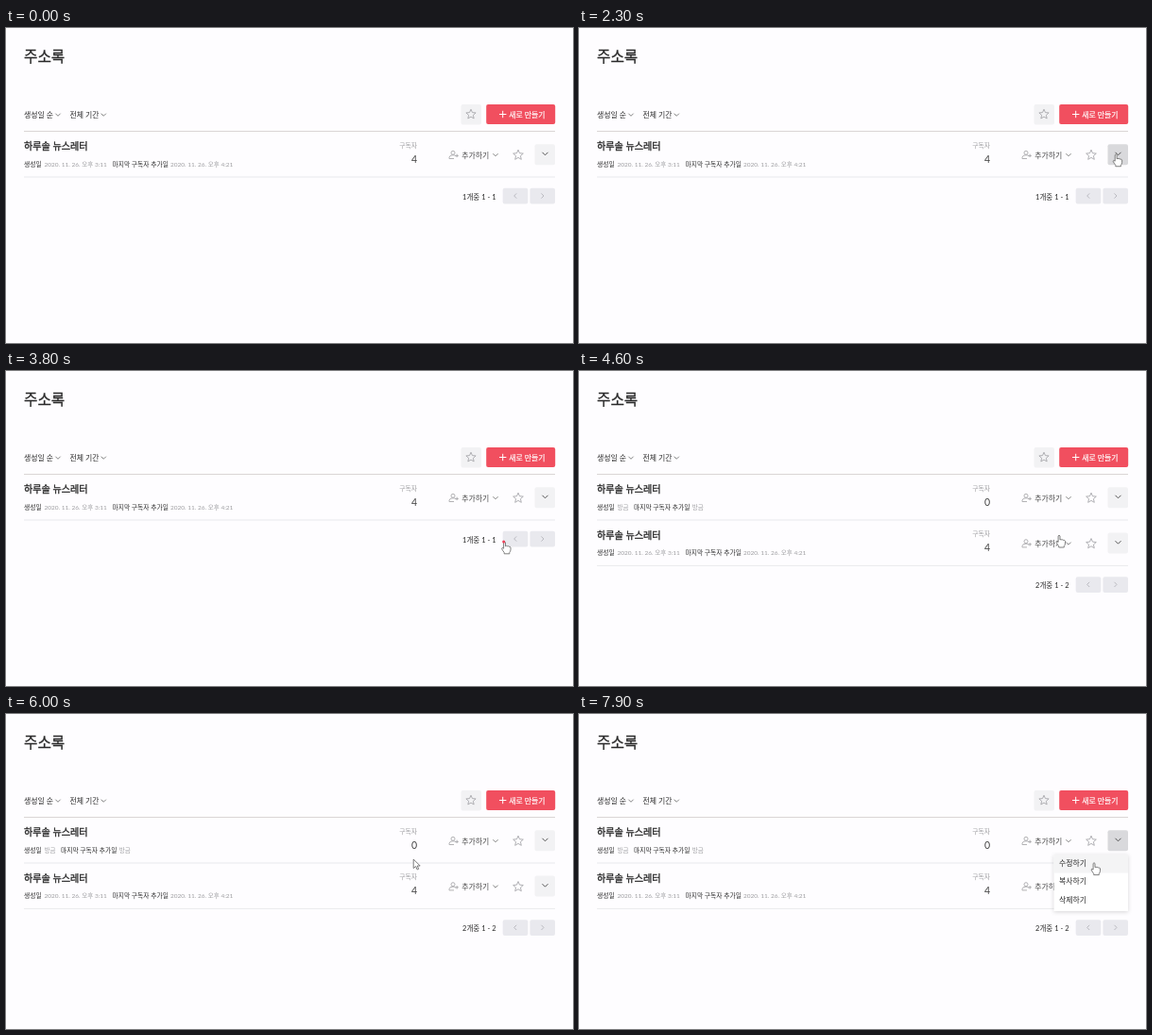
These frames come from a looping animation (600 by 334 pixels, 8000 ms). An HTML page:

```html
<!DOCTYPE html>
<html lang="ko">
<head>
<meta charset="utf-8">
<title>주소록</title>
<style>
html, body { margin: 0; width: 100%; height: 100%; overflow: hidden; background: #fefdff; }
svg { display: block; width: 600px; height: 334px; font-family: Lato, 'Noto Sans CJK KR', sans-serif; font-size: 7.9px; fill: #2a2a2a; }
.title { font-size: 15.7px; stroke: #2a2a2a; stroke-width: .3; }
.name { font-size: 10.1px; stroke: #2a2a2a; stroke-width: .35; }
.small { font-size: 6.75px; }
.date { font-size: 6.5px; }
.dim { fill: #9c9c9f; }
.count { font-size: 10.5px; fill: #444; }
.total { font-size: 7.5px; }
.add { fill: #444; }
.create { fill: #fff; stroke: #fff; stroke-width: .2; }
.line { fill: none; stroke: #777; stroke-width: .9; }
.soft { fill: #f2f2f4; }
.page { fill: #e9e9ee; }
.menu { filter: drop-shadow(0 1px 2px rgba(0, 0, 0, .16)); }
</style>
</head>
<body>
<svg id="stage" viewBox="0 0 600 334"></svg>
<script>
const LOOP = 8000, STEP = 100, ROW = 48.4;

const text = (x, y, str, cls = '', extra = '') => `<text x="${x}" y="${y}" class="${cls}" ${extra}>${str}</text>`;
const rect = (x, y, w, h, attrs = '') => `<rect x="${x}" y="${y}" width="${w}" height="${h}" ${attrs}/>`;
const path = (d, attrs = 'class="line"') => `<path d="${d}" ${attrs}/>`;
const down = (x, y, s = 2.6, color = '#777') => path(`M${x - s} ${y - s / 2}l${s} ${s}l${s} ${-s}`, `class="line" style="stroke:${color}"`);
const side = (x, y, dir) => path(`M${x - dir * 1.2} ${y - 2.6}l${dir * 2.5} 2.6l${-dir * 2.5} 2.6`, 'class="line" style="stroke:#b5b5bb"');
const right = 'text-anchor="end"';

function star(cx, cy, r) {
  const points = Array.from({ length: 10 }, (_, i) => {
    const a = i * Math.PI / 5 - Math.PI / 2, d = i % 2 ? r * .46 : r;
    return `${(cx + d * Math.cos(a)).toFixed(2)},${(cy + d * Math.sin(a)).toFixed(2)}`;
  });
  return `<polygon points="${points.join(' ')}" class="line" style="stroke:#a8a8ac" stroke-linejoin="round"/>`;
}

function person(x, y) {
  return `<g class="line" style="stroke:#a0a0a3;stroke-width:.8"><circle cx="${x + 4}" cy="${y - 2.2}" r="2"/>` +
    `<path d="M${x} ${y + 4}v-1.2q.3-2.6 4-2.6q2.2 0 3.2 1.4M${x} ${y + 4}h5M${x + 8.2} ${y - .8}v3.4M${x + 6.5} ${y + .9}h3.4"/></g>`;
}

// One list entry, drawn at the height of the first row
function row(id, count, made, added, labelX, addedX) {
  return `<g id="${id}">` +
    text(19, 129.2, '하루솔 뉴스레터', 'name') +
    text(19, 146.8, '생성일', 'small') + text(40.5, 146.8, made, 'date dim') +
    text(labelX, 146.8, '마지막 구독자 추가일', 'small') + text(addedX, 146.8, added, 'date dim') +
    text(435, 127, '구독자', 'small dim', right) + text(435, 142.7, count, 'count', right) +
    person(469, 134.5) + text(482.3, 137.9, '추가하기', 'add') + down(518, 134.5) + star(542, 134.8, 5.6) +
    rect(559.5, 123.2, 21.5, 22, 'rx="2" class="soft button"') + down(570.5, 133.3, 3, '#444') +
    rect(19, 157.5, 562, 1, 'fill="#eaeaed"') + '</g>';
}

const arrow = path('M0 0V9.6L2.4 7.5L4 11L5.5 10.3L4 7H7Z', 'id="arrow" fill="#fff" stroke="#666" stroke-width=".85"');
const hand = path('M-.9 .9Q0-.7 1 .9V5Q2 4.1 2.9 5Q3.9 4.4 4.7 5.4Q6 5 6.5 6.3V9Q6.2 10.7 5.3 11.6V13H-.3V11.7Q-2 9.6-3 7.4Q-2.7 5.9-.9 7.4Z',
  'id="hand" fill="#fff" stroke="#6a6a6a" stroke-width=".85" stroke-linejoin="round"');

const stage = document.getElementById('stage');
stage.innerHTML =
  text(19, 36.4, '주소록', 'title') +
  text(19, 95.4, '생성일 순') + down(55, 92) +
  text(67.5, 95.4, '전체 기간') + down(103.3, 92) +
  rect(481.5, 81, 21.5, 21.5, 'rx="2" class="soft"') + star(492, 91.6, 5.4) +
  rect(508.2, 80.9, 73, 21.2, 'rx="2" fill="#f14f5f"') +
  path('M522 91.5h7.4M525.7 87.8v7.4', 'stroke="#fff"') +
  text(532.3, 94.5, '새로 만들기', 'create') +
  rect(19, 109, 562, 1, 'fill="#dad5d5"') +
  row('fresh', 0, '방금', '방금', 58, 119.7) +
  row('first', 4, '2020. 11. 26. 오후 3:11', '2020. 11. 26. 오후 4:21', 112.5, 174) +
  '<g id="pager">' + text(518.5, 181.7, '', 'total', right + ' id="total"') +
  rect(525.7, 169.8, 26.6, 16.7, 'rx="2" class="page"') + side(539, 178, -1) +
  rect(554.4, 169.8, 26.6, 16.7, 'rx="2" class="page"') + side(567.7, 178, 1) + '</g>' +
  '<g id="menu">' + rect(502.5, 149, 78.5, 60, 'class="menu" fill="#fff"') +
  rect(502.5, 149, 78.5, 19.5, 'id="hover" fill="#f4f4f5"') +
  ['수정하기', '복사하기', '삭제하기'].map((s, i) => text(508, 161 + i * 19.4, s)).join('') + '</g>' +
  `<g id="cursor">${arrow}${hand}<circle id="click" cx="-.8" cy=".2" r="1.5" fill="#ef4058"/></g>`;

const $ = id => document.getElementById(id);
const show = (id, on) => $(id).style.display = on ? '' : 'none';
const shift = (id, x, y) => $(id).setAttribute('transform', `translate(${x} ${y})`);
const within = (t, spans) => spans.some(([a, b]) => t >= a && t < b);

// time, x, y of the pointer tip
const track = [
  [0, 380, 204], [400, 380, 204], [600, 379.5, 200.5], [1900, 379.5, 200.5],
  [2400, 590, 126], [2600, 570.5, 133.6], [2800, 570.5, 133.6], [3200, 527.5, 180.8],
  [4500, 527.5, 180.8], [4600, 508, 174], [5400, 431.2, 154], [6400, 431.2, 154],
  [7100, 570.5, 133.6], [7500, 570.5, 133.6], [7900, 545, 157.6], [8000, 545, 157.6]
];
const opened = [[2800, 3800], [7500, 8000]];
const clicks = [[2800, 2900], [3800, 3900], [7500, 7600]];
const insertAt = 4000;

function pointer(t) {
  const i = track.findIndex(k => k[0] > t);
  const [t0, x0, y0] = track[i - 1], [t1, x1, y1] = track[i];
  const p = (t - t0) / (t1 - t0), e = p * p * (3 - 2 * p);
  return [x0 + (x1 - x0) * e, y0 + (y1 - y0) * e];
}

function draw(now) {
  const t = Math.floor(now % LOOP / STEP) * STEP;
  const [x, y] = pointer(t);
  const two = t >= insertAt, menu = within(t, opened);
  const onButton = x > 559 && x < 581 && y > 123 && y < 145;
  const item = Math.floor((y - 149) / 19.5);
  const onItem = menu && x > 502 && item >= 0 && item < 3;
  const useHand = onButton || onItem || (t >= 3800 && t < 5400 && x > 468);

  show('fresh', two);
  shift('first', 0, two ? ROW : 0);
  shift('pager', 0, two ? ROW : 0);
  $('total').textContent = two ? '2개중 1 - 2' : '1개중 1 - 1';
  const active = two ? 'fresh' : 'first';
  for (const id of ['fresh', 'first'])
    $(id).querySelector('.button').style.fill = id === active && (menu || onButton) ? '#d9d9dc' : '';

  show('menu', menu);
  show('hover', onItem);
  $('hover').setAttribute('y', 149 + item * 19.5);

  show('cursor', t >= 200);
  shift('cursor', x, y);
  show('arrow', !useHand);
  show('hand', useHand);
  show('click', within(t, clicks));
}

const start = performance.now();
function tick() {
  draw(performance.now() - start);
  requestAnimationFrame(tick);
}
tick();
</script>
</body>
</html>
```
